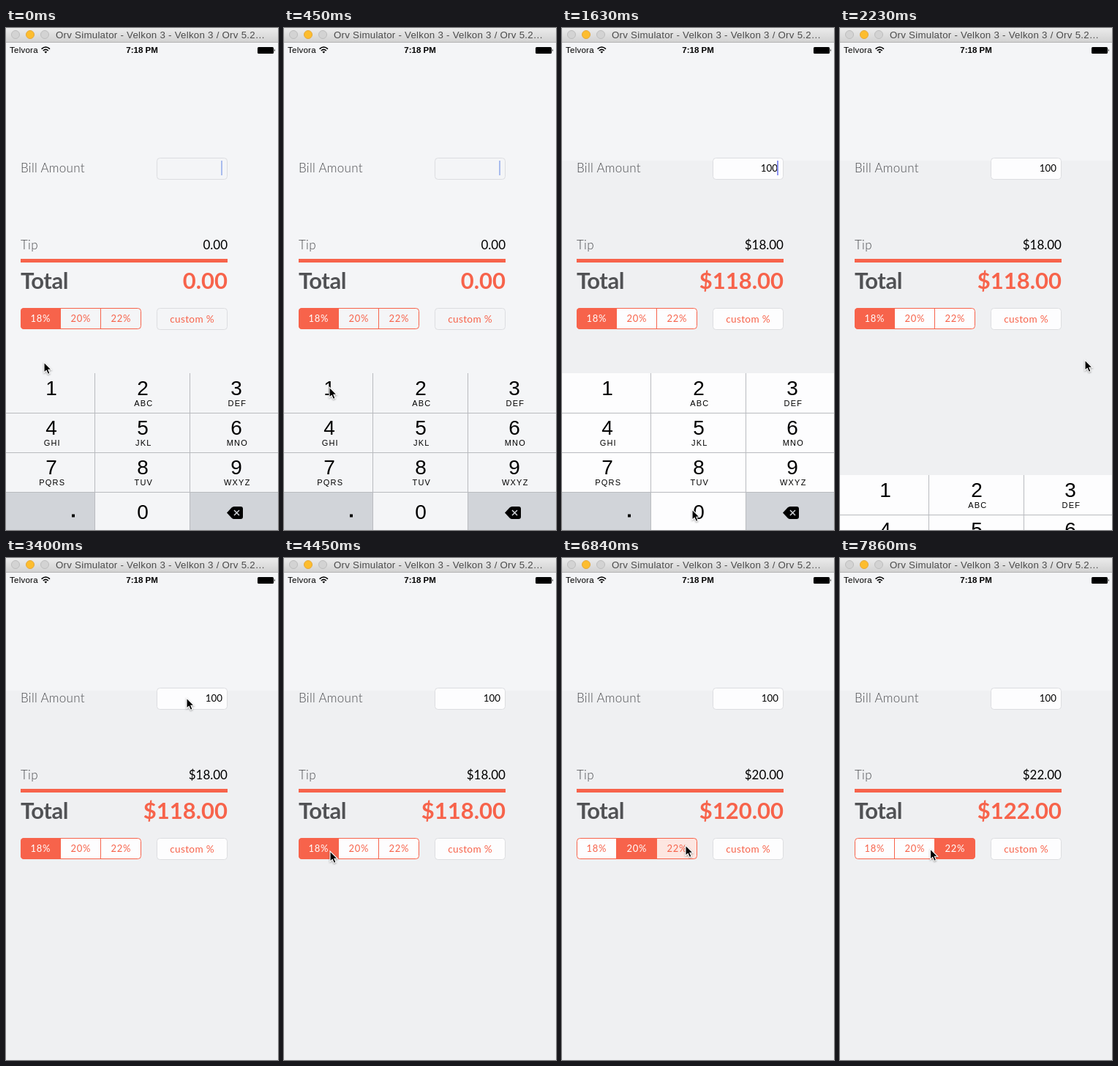
Write an HTML page that moves like this. It is 372 px wide and 685 px high and loops after 8 s.

```html
<!DOCTYPE html>
<html lang="en">
<head>
<meta charset="utf-8">
<title>Tip calculator</title>
<style>
  html, body { margin: 0; width: 100%; height: 100%; overflow: hidden; background: #f4f5f7; }
  svg { display: block; width: 372px; height: 685px; }
  text { font-family: "Liberation Sans", Arial, sans-serif; white-space: pre; }
  .app text { font-family: Lato, "Open Sans", sans-serif; }
  .app .label { font-size: 17px; font-weight: 300; letter-spacing: .3px; fill: #4c4d50; }
  .app .big { font-size: 31px; font-weight: 700; }
  .end { text-anchor: end; }
  .mid { text-anchor: middle; }
  .accent { fill: #f7634b; }
  .seg text { font-size: 13px; letter-spacing: .8px; }
  .digit { font-size: 28px; }
  .letters { font-size: 11px; letter-spacing: 1.2px; }
</style>
</head>
<body>
<svg viewBox="0 0 372 685">
  <defs>
    <linearGradient id="bar" x2="0" y2="1">
      <stop stop-color="#ebebeb"/><stop offset="1" stop-color="#d2d2d2"/>
    </linearGradient>
    <clipPath id="segClip"><rect x="20" y="382" width="165" height="29" rx="4.5"/></clipPath>
  </defs>

  <rect width="372" height="685" fill="#f4f5f7"/>
  <rect id="shade" y="181" height="504" fill="#eff0f2"/>

  <g id="titleBar">
    <rect width="372" height="19" fill="url(#bar)"/>
    <rect y="19" width="372" height="1" fill="#b4b4b4"/>
    <circle cx="13" cy="9" r="5.5" fill="#d3d3d3" stroke="#bdbdbd"/>
    <circle cx="33" cy="9" r="5.5" fill="#fdbd2e" stroke="#e5a83a"/>
    <circle cx="53" cy="9" r="5.5" fill="#d3d3d3" stroke="#bdbdbd"/>
    <text x="68" y="14" font-size="13.3" letter-spacing=".25" fill="#4b4b4b">Orv Simulator - Velkon 3 - Velkon 3 / Orv 5.2…</text>
  </g>

  <g id="statusBar">
    <text x="5" y="34" font-size="11.5" letter-spacing=".25">Telvora</text>
    <g fill="none" stroke="#000" stroke-width="1.6">
      <path d="M48.6 28.6Q54.3 23.4 60 28.6"/>
      <path d="M50.8 31Q54.3 27.8 57.8 31"/>
    </g>
    <path d="M52.4 32.6Q54.3 30.9 56.2 32.6L54.3 34.6Z"/>
    <text class="mid" x="186" y="34" font-size="11.5" font-weight="700">7:18 PM</text>
    <rect x="344" y="26" width="22" height="9" rx="1.5"/>
    <path d="M366.8 28.8Q368.8 30.5 366.8 32.2Z"/>
  </g>

  <g class="app">
    <text class="label" x="20" y="197">Bill Amount</text>
    <rect class="box" x="206.5" y="177.5" width="96" height="29" rx="4" stroke="#dcdde0"/>
    <text id="bill" class="end" y="196" font-size="13.3"></text>
    <rect id="caret" x="294" y="181" width="2" height="20"/>
    <text class="label" x="20" y="302">Tip</text>
    <text id="tip" class="end" x="303" y="302" font-size="17"></text>
    <rect class="accent" x="20" y="315" width="283" height="5"/>
    <text class="big" x="20" y="356" fill="#515255" letter-spacing="-.5">Total</text>
    <text id="total" class="big end accent" x="303" y="356"></text>
    <g class="seg" id="seg"></g>
    <rect class="box" x="206.5" y="382.5" width="96" height="29" rx="4" stroke="#dcdde0"/>
    <text class="mid accent" x="254.6" y="402" font-size="13.6" letter-spacing=".35">custom %</text>
  </g>

  <g id="pad"></g>

  <path id="cursor" d="M0 0V14.2L3.2 11.3L5.4 16.4L8 15.3L5.9 10.3H10.2Z"
        stroke="#fff" stroke-width="1.1" style="filter:drop-shadow(0 1px 1px rgba(0,0,0,.35))"/>
</svg>

<script>
const LOOP = 8000, TICK = 148.3;
const ACCENT = '#f7634b', PALE = '#f4f5f7', WHITE = '#fdfdfe';
const $ = id => document.getElementById(id);
const setAll = (el, attrs) => Object.entries(attrs).forEach(([k, v]) => el.setAttribute(k, v));

// Pointer path: tick, x, y
const PATH = [
  [0, 52, 456], [3, 62, 490], [4, 63, 493], [7, 173, 652], [8, 178, 657], [11, 178, 657],
  [14, 335, 456], [15, 335, 453], [17, 335, 453], [22, 252, 200], [23, 247, 191],
  [24, 255, 191], [25, 265, 189], [26, 265, 189], [30, 63, 400], [33, 98, 406],
  [34, 116, 406], [35, 144, 404], [37, 164, 395], [39, 169, 392], [50, 169, 392],
  [52, 138, 397], [53, 123.5, 397]
];

const RATES = [18, 20, 22];
const EDGES = [20, 74.5, 129.5, 185];

// Latest row whose tick has been reached
const stepAt = (rows, k) => rows.filter(r => r[0] <= k).pop()[1];
const BILL = [[0, ''], [4, '1'], [10, '10'], [11, '100']];
const CHOICE = [[0, 0], [34, 1], [47, 2]];
const PRESSED = [[0, -1], [33, 1], [34, -1], [46, 2], [47, -1]];
const SLIDE = [[0, 0], [15, 139], [16, 208], [17, 220]];
const SHADE = [[0, 0], [4, 303], [10, 372]];

function pointerAt(k) {
  const i = PATH.findIndex(p => p[0] >= k);
  if (i < 1) return PATH[0].slice(1);
  const [k0, x0, y0] = PATH[i - 1], [k1, x1, y1] = PATH[i];
  const u = (k - k0) / (k1 - k0);
  return [x0 + (x1 - x0) * u, y0 + (y1 - y0) * u];
}

function buildSegments() {
  const cells = RATES.map((r, i) =>
    `<rect id="cell${i}" x="${EDGES[i]}" y="382" width="${EDGES[i + 1] - EDGES[i]}" height="29"/>`);
  const labels = RATES.map((r, i) =>
    `<text id="rate${i}" class="mid" x="${47.4 + 55 * i}" y="401">${r}%</text>`);
  $('seg').innerHTML = `<g clip-path="url(#segClip)">${cells.join('')}</g>
    <path d="M74.5 382V411M129.5 382V411" stroke="${ACCENT}"/>
    <rect x="20.5" y="382.5" width="164" height="28" rx="4" fill="none" stroke="${ACCENT}"/>
    ${labels.join('')}`;
}

function buildPad() {
  const letters = ['', 'ABC', 'DEF', 'GHI', 'JKL', 'MNO', 'PQRS', 'TUV', 'WXYZ'];
  const mids = [62, 187, 315];
  const keys = letters.map((s, i) => {
    const x = mids[i % 3], y = 501 + 54 * Math.floor(i / 3);
    return `<text class="digit mid" x="${x}" y="${y}">${i + 1}</text>
      <text class="letters mid" x="${x + 1.3}" y="${y + 15}">${s}</text>`;
  });
  $('pad').innerHTML = `<rect y="471" width="372" height="214" fill="${PALE}"/>
    <rect id="padLit" y="471" height="214" fill="${WHITE}"/>
    <path d="M0 633H121V685H0ZM252 633H372V685H252Z" fill="#d1d4d9"/>
    <path d="M0 525.5H372M0 579.5H372M0 633.5H372M121.5 471V685M251.5 471V685" stroke="#b9bbbf"/>
    ${keys.join('')}
    <text class="digit mid" x="187" y="670">0</text>
    <rect x="90" y="663.5" width="4" height="4"/>
    <path d="M302 661.5L308.5 654.6Q310 653 312 653H321Q324 653 324 656V667Q324 670 321 670H312Q310 670 308.5 668.4Z"/>
    <path d="M312 658L319 665M319 658L312 665" stroke="#d1d4d9" stroke-width="1.5"/>`;
}

function draw(k) {
  const bill = stepAt(BILL, k), choice = stepAt(CHOICE, k), pressed = stepAt(PRESSED, k);
  const lit = stepAt(SHADE, k);
  const paper = lit ? WHITE : PALE;
  const money = v => bill ? '$' + v.toFixed(2) : '0.00';
  const tip = bill * RATES[choice] / 100;
  const editing = k < 14;

  $('shade').setAttribute('width', lit);
  $('padLit').setAttribute('width', lit);
  document.querySelectorAll('.box').forEach(b => b.setAttribute('fill', paper));

  $('bill').textContent = bill;
  $('bill').setAttribute('x', editing ? 295 : 296);
  $('tip').textContent = money(tip);
  $('total').textContent = money(+bill + tip);
  setAll($('caret'), { fill: lit ? '#8b92f0' : '#a9bcee', opacity: editing ? 1 : 0 });

  RATES.forEach((r, i) => {
    $('cell' + i).setAttribute('fill', i === choice ? ACCENT : i === pressed ? '#fde6e1' : paper);
    $('rate' + i).setAttribute('fill', i === choice ? '#fff' : ACCENT);
  });

  $('pad').setAttribute('transform', `translate(0 ${stepAt(SLIDE, k)})`);
  $('cursor').setAttribute('transform', `translate(${pointerAt(k).join(' ')})`);
}

let shown = -1;
function loop() {
  const k = Math.min(53, Math.floor(performance.now() % LOOP / TICK + 0.08));
  if (k !== shown) draw(shown = k);
  requestAnimationFrame(loop);
}

buildSegments();
buildPad();
loop();
</script>
</body>
</html>
```
